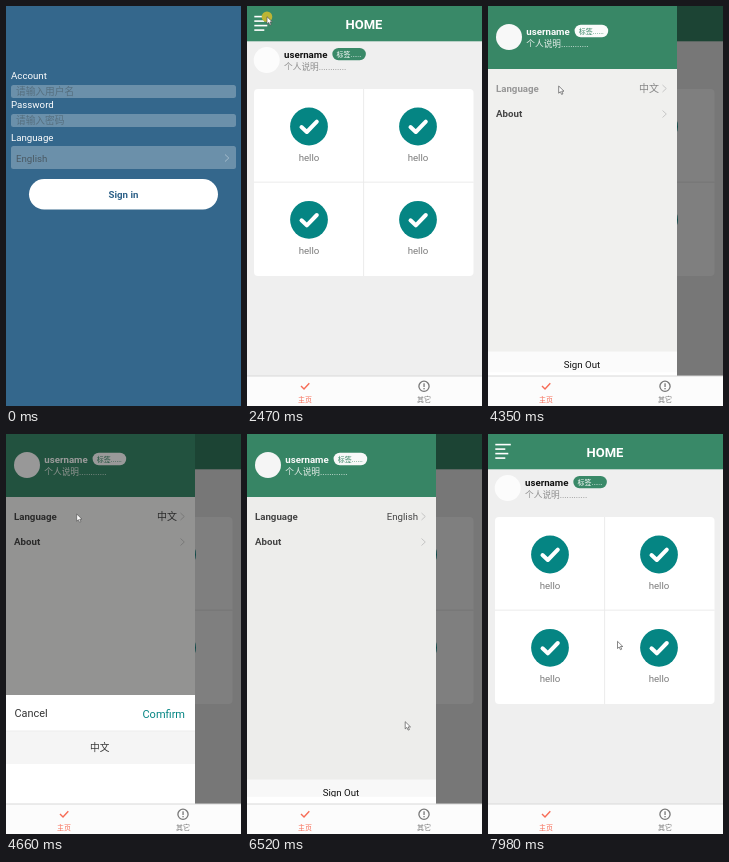
These frames come from a looping animation (235x400 px, 8000 ms). An HTML page with a canvas:

```html
<!DOCTYPE html>
<html lang="en">
<head>
<meta charset="utf-8">
<title>App walkthrough</title>
<style>
html, body { margin: 0; width: 100%; height: 100%; overflow: hidden; background: #34678c; }
canvas { display: block; width: 235px; height: 400px; }
</style>
</head>
<body>
<canvas id="stage"></canvas>
<script>
const W = 235, H = 400, LOOP = 8000;
const BAR = 370, DRAWER = 189;
const GREEN = '#398968', TEAL = '#058583', BLUE = '#34678c', RED = '#f76c56';
const FONT = 'Roboto, "Noto Sans CJK SC", "Noto Sans CJK", sans-serif';

const canvas = document.getElementById('stage');
const ctx = canvas.getContext('2d');
const dpr = window.devicePixelRatio || 1;
canvas.width = W * dpr;
canvas.height = H * dpr;

// Timing helpers
const span = (t, a, b) => Math.min(1, Math.max(0, (t - a) / (b - a)));
const mix = (a, b, k) => a + (b - a) * k;
const smooth = k => k * k * (3 - 2 * k);
const bez = (s, a, b) => 3 * s * (1 - s) * (1 - s) * a + 3 * s * s * (1 - s) * b + s * s * s;

function ease(k) { // same curve as the CSS keyword
  let lo = 0, hi = 1;
  for (let i = 0; i < 20; i++) {
    const mid = (lo + hi) / 2;
    if (bez(mid, 0.25, 0.25) < k) lo = mid; else hi = mid;
  }
  return k <= 0 ? 0 : k >= 1 ? 1 : bez(lo, 0.1, 1);
}

// Drawing helpers
function rect(x, y, w, h, color) {
  ctx.fillStyle = color;
  ctx.fillRect(x, y, w, h);
}

function round(x, y, w, h, r, color) {
  ctx.fillStyle = color;
  ctx.beginPath();
  ctx.roundRect(x, y, w, h, r);
  ctx.fill();
}

function disc(x, y, r, color) {
  ctx.fillStyle = color;
  ctx.beginPath();
  ctx.arc(x, y, r, 0, 2 * Math.PI);
  ctx.fill();
}

function line(points, color, width, cap = 'butt') {
  ctx.strokeStyle = color;
  ctx.lineWidth = width;
  ctx.lineCap = cap;
  ctx.lineJoin = cap === 'round' ? 'round' : 'miter';
  ctx.beginPath();
  points.forEach(([x, y]) => ctx.lineTo(x, y));
  ctx.stroke();
}

// y is the middle of the capital letters
function text(str, x, y, size, color, align = 'left', weight = 400) {
  ctx.font = `${weight} ${size}px ${FONT}`;
  ctx.textAlign = align;
  ctx.fillStyle = color;
  ctx.fillText(str, x, y + size * 0.355);
}

function chevron(x, y, color) {
  line([[x - 2, y - 3.5], [x + 1.8, y], [x - 2, y + 3.5]], color, 0.9);
}

function at(x, y, draw) {
  ctx.save();
  ctx.translate(x, y);
  draw();
  ctx.restore();
}

// Screens
function login() {
  const field = '#6b90aa';
  rect(0, 0, W, H, BLUE);
  text('Account', 5, 70, 9.7, '#fff');
  round(5, 79, 225, 13, 2.5, field);
  text('请输入用户名', 10, 85.6, 9.7, '#566f7f');
  text('Password', 5, 99, 9.7, '#fff');
  round(5, 108, 225, 13, 2.5, field);
  text('请输入密码', 10, 114.6, 9.7, '#566f7f');
  text('Language', 5, 131.5, 9.7, '#fff');
  round(5, 140, 225, 23, 2.5, field);
  text('English', 10, 152.3, 9.7, '#4b5a64');
  chevron(221, 152, '#a9bfce');
  round(23, 173, 189, 30.5, 15.2, '#fff');
  text('Sign in', 117.5, 188.5, 9.7, '#2f6289', 'center', 700);
}

function profile(x, y, ink, sub, tagFill, tagInk) {
  disc(x - 17.3, y + 6, 13, '#fcfcfc');
  text('username', x, y + 0.3, 9.7, ink, 'left', 700);
  round(x + 48.3, y - 6.2, 33.6, 12.4, 6.2, tagFill);
  text('标签......', x + 65.1, y + 0.3, 7, tagInk, 'center');
  text('个人说明............', x, y + 12.9, 8.7, sub);
}

function tile(x, y) {
  disc(x, y, 18.9, TEAL);
  line([[x - 7.5, y + 0.5], [x - 2.2, y + 5.5], [x + 7.8, y - 4.8]], '#fff', 4, 'round');
  text('hello', x, y + 30.8, 9.7, '#7c7c7c', 'center');
}

function tabBar() {
  rect(0, BAR, W, H - BAR, '#fcfcfc');
  rect(0, BAR - 0.5, W, 1, '#d9d9d9');
  line([[54, 380], [57, 383], [62.3, 377.3]], RED, 1.4);
  text('主页', 58, 393.3, 7, RED, 'center');
  ctx.strokeStyle = '#777';
  ctx.lineWidth = 1.3;
  ctx.beginPath();
  ctx.arc(177, 380.3, 5.1, 0, 2 * Math.PI);
  ctx.stroke();
  rect(176.4, 377.3, 1.3, 3.7, '#777');
  rect(176.4, 382, 1.3, 1.3, '#777');
  text('其它', 177, 393.3, 7, '#777', 'center');
}

function home() {
  rect(0, 0, W, H, '#efefef');
  rect(0, 0, W, 35.3, GREEN);
  [15.5, 10, 13, 10].forEach((w, i) => rect(7.3, 9.8 + i * 4.5, w, 1.6, '#fff'));
  text('HOME', 117, 18.3, 13, '#fff', 'center', 700);
  profile(37, 48.1, '#111', '#8f8f8f', GREEN, '#fff');
  round(7, 83, 219.5, 187, 4, '#fff');
  rect(116.2, 83, 0.9, 187, '#e9e9e9');
  rect(7, 175.7, 219.5, 0.9, '#e9e9e9');
  for (const y of [120.5, 213.8]) for (const x of [62, 171]) tile(x, y);
}

function drawer(t) {
  const english = t >= 6290;
  const pressed = t >= 4300 && t < 4430;
  const ink = '#464646';
  rect(0, 0, DRAWER, BAR, '#f4f4f2');
  rect(0, 0, DRAWER, 63, GREEN);
  profile(38.3, 25, '#fff', '#eaf3ee', '#fff', GREEN);
  text('Language', 8, 82.6, 9.7, pressed ? '#999' : ink, 'left', 700);
  text(english ? 'English' : '中文', 171, 82.6, english ? 9.7 : 10, pressed ? '#888' : ink, 'right');
  chevron(176.5, 82.5, '#c4c4c4');
  text('About', 8, 108, 9.7, ink, 'left', 700);
  chevron(176.5, 108, '#c4c4c4');
  rect(0, 345.5, DRAWER, BAR - 345.5, '#fff');
  text('Sign Out', 94, 359, 9.7, '#111', 'center');
}

function picker(t) {
  const shift = -31.5 * (1 - smooth(span(t, 5230, 5640)));
  rect(0, 261, DRAWER, 109, '#fff');
  text('Cancel', 8.5, 279.6, 10.9, '#333');
  text('Comfirm', 179, 279.6, 11, TEAL, 'right');
  rect(0, 297, DRAWER, 33, '#f5f5f5');
  rect(0, 296.6, DRAWER, 0.7, '#e8e8e8');
  ctx.beginPath();
  ctx.rect(0, 297, DRAWER, 73);
  ctx.clip();
  const onFirst = shift > -16;
  text('English', 94, 314 + shift, 9.7, onFirst ? '#333' : '#999', 'center');
  text('中文', 93.7, 345.5 + shift, 9.7, onFirst ? '#999' : '#333', 'center');
}

// Pointer moves: start, end, x, y reached
const moves = [
  [130, 910, 135.2, 186.5],
  [1690, 2230, 20, 10.7],
  [2790, 3160, 124, 306],
  [3255, 3330, 124, 305],
  [3410, 4030, 70.7, 80],
  [4740, 5560, 100, 306],
  [5590, 5970, 158.2, 287.7],
  [6830, 7210, 210, 289.7],
  [7830, 7980, 129.5, 207.3]
];
const clicks = [[910, 1080], [2400, 2550], [4030, 4180], [6120, 6290], [7210, 7360]];

function pointer(t) {
  let x = 237, y = 402;
  for (const [a, b, nx, ny] of moves) {
    const k = smooth(span(t, a, b));
    x = mix(x, nx, k);
    y = mix(y, ny, k);
  }
  if (clicks.some(([a, b]) => t >= a && t < b)) disc(x, y, 5.3, '#bdb535');
  at(x, y, () => {
    const p = new Path2D('M0 0V7.2L1.7 5.7L2.9 8.4L4.2 7.9L3 5.2H5.3Z');
    ctx.fillStyle = '#fff';
    ctx.fill(p);
    ctx.strokeStyle = '#555';
    ctx.lineWidth = 0.7;
    ctx.stroke(p);
  });
}

function draw(t) {
  ctx.setTransform(dpr, 0, 0, dpr, 0, 0);
  const leave = ease(span(t, 1160, 1460));
  const open = ease(span(t, 2532, 2832)) * (1 - ease(span(t, 7320, 7600)));
  const sheet = ease(span(t, 4335, 4640)) * (1 - ease(span(t, 6260, 6640)));

  at(-80 * (1 - leave), 0, () => { home(); tabBar(); });
  if (leave < 1) at(W * leave, 0, login);

  if (open > 0) {
    rect(0, 0, W, BAR, `rgba(0,0,0,${0.5 * open})`);
    at(-DRAWER * (1 - open), 0, () => drawer(t));
    if (sheet > 0) {
      rect(0, 0, DRAWER, BAR, `rgba(0,0,0,${0.4 * sheet})`);
      at(0, 109 * (1 - sheet), () => picker(t));
    }
    tabBar();
  }
  pointer(t);
}

const start = performance.now();
function tick() {
  draw((performance.now() - start) % LOOP);
  requestAnimationFrame(tick);
}
tick();
</script>
</body>
</html>
```
